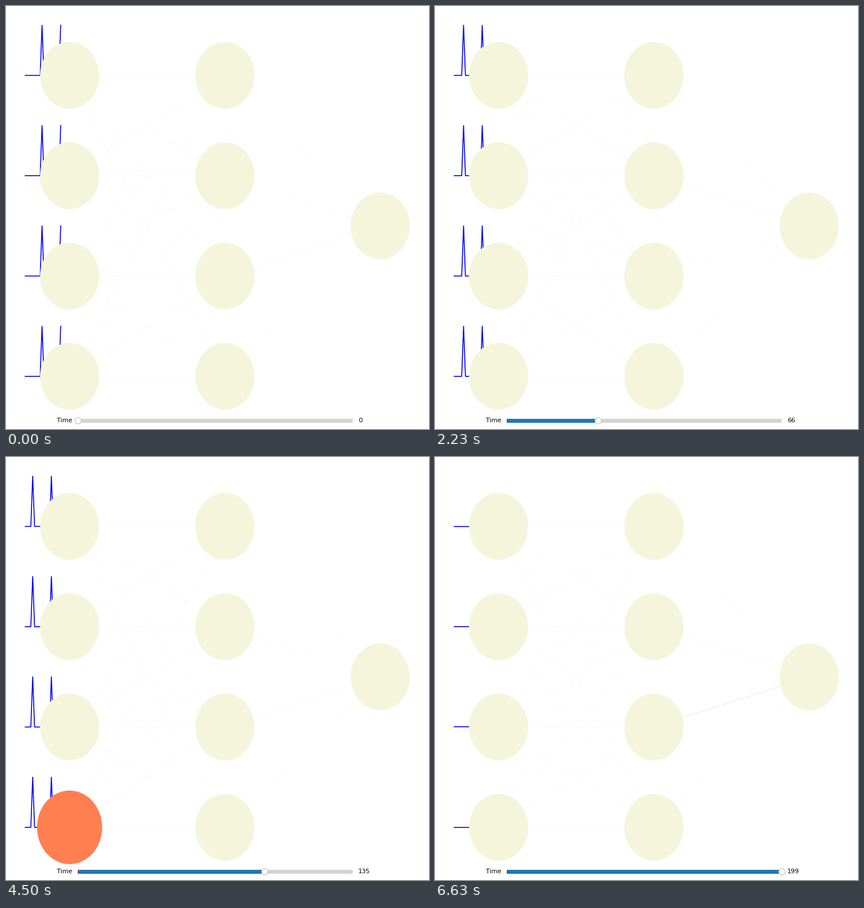
Recreate the animation shown at these times as a matplotlib script. Size 748 px wide and 748 px high, loop 6.66 s.

```python
import numpy as np
import matplotlib.pyplot as plt
from matplotlib.animation import FuncAnimation
from matplotlib.patches import Circle
from matplotlib.widgets import Slider

plt.rcParams["font.family"] = "DejaVu Sans"

STEPS, WINDOW, PERIOD = 200, 20, 10
RADIUS = 1 / 3
IDLE, FIRED = "beige", "coral"
FAINT, ACTIVE = 0.012, 0.06

fig = plt.figure(figsize=(9.35, 9.35), dpi=80, facecolor="white")
ax = fig.add_axes([0, 0, 1, 1])
ax.axis("off")


def padded(lo, hi, margin=0.05):
    pad = (hi - lo) * margin
    return lo - pad, hi + pad


ax.set_xlim(*padded(-0.5, 3.5 + RADIUS))
ax.set_ylim(*padded(-RADIUS, 3.5))

# Layers from left to right, rows from top to bottom
layers = [[(1.75 * col, 3 - row) for row in range(4)] for col in range(2)]
layers.append([(3.5, 1.5)])


def connect(a, b):
    return ax.plot(*zip(a, b), color="black", alpha=FAINT, lw=1.5, zorder=1)[0]


edges = {}
for col in range(2):
    for i, a in enumerate(layers[col]):
        for j, b in enumerate(layers[col + 1]):
            edges[col, i, j] = connect(a, b)

cells = {}
for col, layer in enumerate(layers):
    for row, pos in enumerate(layer):
        cells[col, row] = ax.add_patch(Circle(pos, RADIUS, fc=IDLE, lw=0, zorder=3))

# Input spike train, padded with silence after the last step
train = np.zeros(STEPS + WINDOW)
train[:STEPS:PERIOD] = 0.5
trace_x = np.linspace(-0.5, -0.1, WINDOW)
traces = [ax.plot(trace_x, np.full(WINDOW, y), color="blue", lw=1.5, zorder=2)[0]
          for _, y in layers[0]]

slider_ax = fig.add_axes([0.17, 0.0095, 0.65, 0.02])
slider = Slider(slider_ax, "Time", 0, STEPS - 1, valinit=0, valstep=1, valfmt="%d")
slider.drawon = False


def firing(t):
    """Cells that spike at step t, as (layer, row)."""
    phase = t % PERIOD
    active = set()
    if t and phase in (0, 5):
        active.add((0, 3))
    if t and phase == 0:
        active.add((0, 1))
        if t <= 60:
            active.add((2, 0))
    if phase == 8:
        active.add((1, 2))
    return active


def update(t):
    window = train[t:t + WINDOW][::-1]
    for trace, (_, y) in zip(traces, layers[0]):
        trace.set_ydata(y + window)

    active = firing(t)
    for key, cell in cells.items():
        on = key in active
        cell.set_facecolor(FIRED if on else IDLE)
        cell.set_radius(RADIUS * (1.1 if on else 1))

    # A hidden spike travels to the output one step later
    arriving = firing(t - 1) if t else set()
    for (col, i, _), edge in edges.items():
        edge.set_alpha(ACTIVE if col == 1 and (1, i) in arriving else FAINT)

    slider.set_val(t)
    return []


anim = FuncAnimation(fig, update, frames=STEPS, interval=33.3,
                     init_func=lambda: update(0), repeat=True, repeat_delay=0)
plt.show()
```
